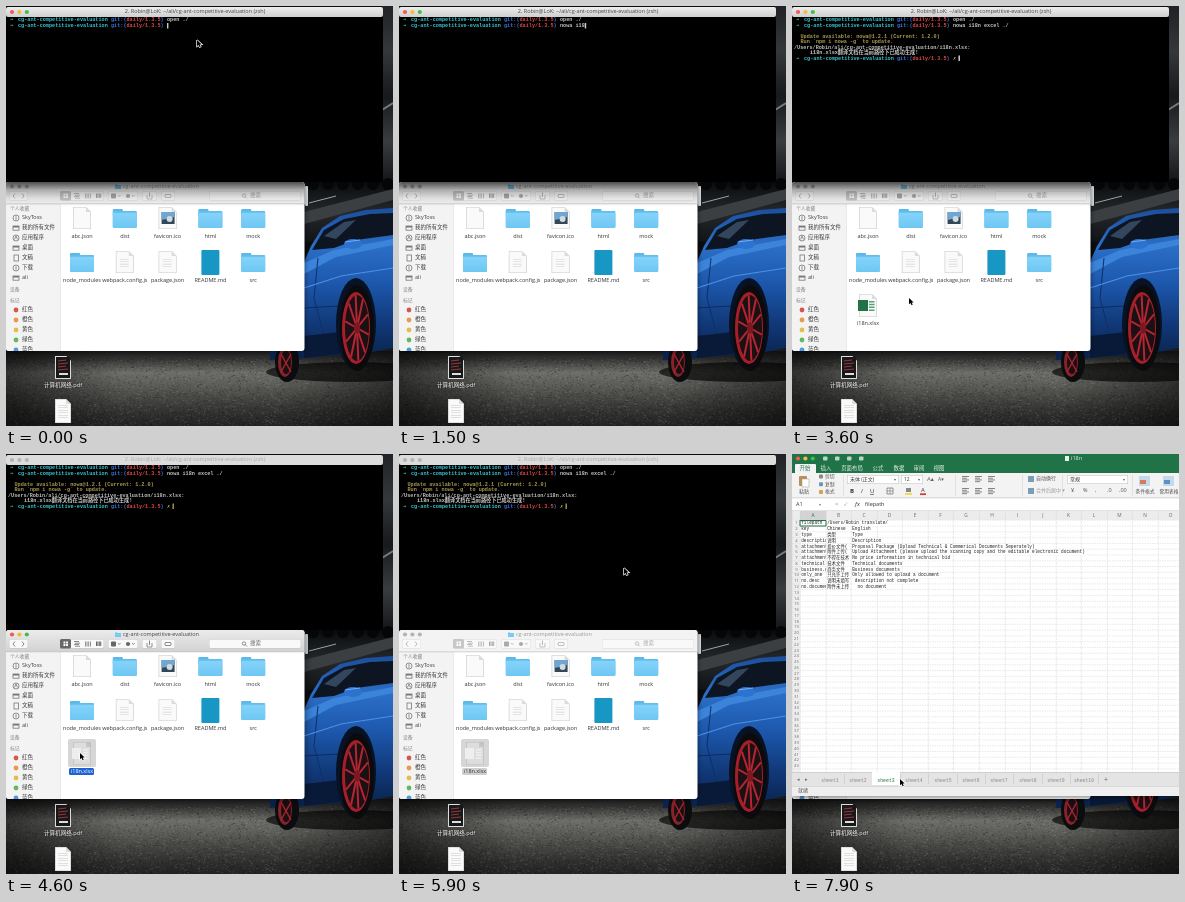
These frames come from a looping animation (387x420 px, 8 s). An HTML page with a canvas:

```html
<!DOCTYPE html>
<html lang="zh">
<head>
<meta charset="utf-8">
<style>
html, body { margin: 0; width: 100%; height: 100%; overflow: hidden; background: #000 }
canvas { display: block }
</style>
</head>
<body>
<canvas id="stage" width="387" height="420"></canvas>
<script>
const W = 387, H = 420, LOOP = 8000;
const SANS = '"Open Sans","Noto Sans CJK SC","Noto Sans CJK",sans-serif';
const MONO = '"Liberation Mono","DejaVu Sans Mono","Noto Sans CJK SC","Noto Sans CJK",monospace';
const screen = document.getElementById('stage').getContext('2d');
let g = screen;

function rect(x, y, w, h, c, r = 0) {
  g.fillStyle = c; g.beginPath(); g.roundRect(x, y, w, h, r); g.fill();
}
function oval(x, y, rx, ry, c) {
  g.fillStyle = c; g.beginPath(); g.ellipse(x, y, rx, ry, 0, 0, 7); g.fill();
}
function dot(x, y, r, c) { oval(x, y, r, r, c); }
function poly(c, ...p) {
  g.fillStyle = c; g.beginPath();
  for (let i = 0; i < p.length; i += 2) g.lineTo(p[i], p[i + 1]);
  g.fill();
}
function line(c, w, ...p) {
  g.strokeStyle = c; g.lineWidth = w; g.beginPath();
  for (let i = 0; i < p.length; i += 2) g.lineTo(p[i], p[i + 1]);
  g.stroke();
}
function text(s, x, y, size, c, align = 'left', font = SANS) {
  g.font = size + 'px ' + font; g.fillStyle = c; g.textAlign = align;
  g.textBaseline = 'middle'; g.fillText(s, x, y);
}
function fade(y0, y1, ...colors) {
  const f = g.createLinearGradient(0, y0, 0, y1);
  colors.forEach((c, i) => f.addColorStop(i / (colors.length - 1), c));
  return f;
}
// Piecewise linear value from [time, value] pairs
function along(keys, t) {
  let i = 1;
  while (i < keys.length - 1 && t > keys[i][0]) i++;
  const [a, b] = [keys[i - 1], keys[i]];
  const k = Math.min(1, Math.max(0, (t - a[0]) / (b[0] - a[0])));
  return a[1] + (b[1] - a[1]) * k;
}
function lights(y, on) {
  ['#f25b52', '#f3bb3a', '#42bd47'].forEach((c, i) => dot(6 + i * 7.4, y, 2.1, on ? c : '#b4b4b4'));
}

function page(x, y, w = 17, h = 22) {
  poly('#c9c9c9', x, y, x + w - 5, y, x + w, y + 5, x + w, y + h, x, y + h);
  poly('#fafafa', x + .6, y + .6, x + w - 5, y + .6, x + w - .6, y + 5, x + w - .6, y + h - .6, x + .6, y + h - .6);
  poly('#dcdcdc', x + w - 5, y, x + w, y + 5, x + w - 5, y + 5);
}
function folder(x, y, w = 24, h = 19) {
  rect(x, y, w * .42, h * .4, '#5bb9ea', 1);
  rect(x, y + h * .1, w, h * .88, '#62bdec', 1);
  rect(x, y + h * .2, w, h * .8, fade(y, y + h, '#8bd6fb', '#6dc7f3'), 1);
}

function wallpaper() {
  rect(0, 0, W, H, '#0b0c0e');
  rect(376, 0, 11, 180, fade(0, 180, '#202225', '#35383b', '#17191b', '#3a3d40', '#101113'));
  line('#777b7e', 2, 376, 104, 387, 97);
  rect(298, 176, 89, 60, fade(176, 236, '#0a0b0c', '#25282b', '#111315'));
  poly('#3b3f42', 298, 206, 387, 183, 387, 194, 298, 218);
  for (let i = 0; i < 6; i++) dot(307 + i * 15, 178, 6, '#050607');
  rect(299, 180, 3, 20, '#d9dfe2', 1);
  line('#9aa2a6', 1, 303, 197, 330, 190);

  rect(0, 335, W, 85, fade(340, 420, '#0e0f10', '#343433', '#6d6d69', '#5a5a57', '#444442', '#30302f', '#232323'));
  let seed = 7;
  const rnd = () => (seed = seed * 16807 % 2147483647) / 2147483647;
  for (let i = 0; i < 4200; i++) {
    const y = 352 + rnd() * 68;
    rect(rnd() * W, y, 1.3, .8, rnd() < .5 ? 'rgba(0,0,0,.28)' : 'rgba(190,190,180,.2)');
  }
  const side = g.createLinearGradient(0, 0, W, 0);
  side.addColorStop(0, 'rgba(0,0,0,.55)'); side.addColorStop(.3, 'rgba(0,0,0,0)');
  side.addColorStop(.7, 'rgba(0,0,0,0)'); side.addColorStop(1, 'rgba(0,0,0,.5)');
  rect(0, 345, W, 75, side);

  oval(345, 366, 85, 10, 'rgba(0,0,0,.65)');
  poly(fade(203, 350, '#1c4f9d', '#2b6fc8', '#1d58ad', '#123c7e', '#0a2450'),
    298, 256, 305, 240, 316, 222, 334, 210, 360, 204, 387, 202, 387, 342, 366, 346, 300, 352, 264, 354, 264, 338, 298, 330);
  poly('#0d1522', 306, 244, 318, 224, 338, 213, 364, 208, 387, 207, 387, 229, 350, 234, 328, 242);
  poly('#33465c', 318, 230, 338, 216, 350, 214, 330, 233);
  poly('#3c83da', 298, 257, 328, 244, 387, 233, 387, 239, 330, 251, 298, 268);
  oval(347, 238, 9, 5, '#2c72cf');
  line('#74aef0', 1, 339, 236, 354, 234);
  line('#0d3068', 1, 312, 252, 308, 292, 318, 330);
  line('#4b92e6', 1.2, 298, 282, 335, 270, 387, 262);
  line('#0c2c5f', 1, 298, 302, 332, 300);
  poly('#081a38', 298, 330, 334, 326, 334, 348, 298, 352);
  oval(350, 318, 20, 46, '#071225');
  oval(351, 322, 17, 43, '#0b0b0d');
  oval(350, 322, 14, 36, '#a51f2b');
  oval(351, 322, 12, 33, '#1b1013');
  for (let i = 0; i < 10; i++) {
    const a = i * Math.PI / 5 + .2;
    line('#b32632', 2, 351, 322, 351 + Math.cos(a) * 12, 322 + Math.sin(a) * 33);
  }
  oval(351, 322, 3, 6, '#7c1821');
  oval(281, 356, 12, 20, '#0b0c0e');
  oval(279, 356, 7, 15, '#87212a');
  oval(280, 356, 5, 12, '#1a0f12');
  line('#a3252f', 1.5, 275, 348, 285, 366);
  line('#a3252f', 1.5, 285, 348, 275, 366);

  page(49, 350, 16, 23);
  rect(50, 351, 14, 21, '#18181a');
  for (let i = 0; i < 4; i++) line('#a43b3f', .9, 52, 355 + i * 3, 60 + i % 2 * 2, 354 + i * 3);
  rect(53, 367, 9, 2, '#ddd');
  g.shadowColor = '#000'; g.shadowBlur = 2;
  text('计算机网络.pdf', 57, 380, 5.6, '#fff', 'center');
  g.shadowBlur = 0;
  page(49, 393, 16, 24);
  for (let i = 0; i < 6; i++) rect(52, 399 + i * 2.5, 10, .5, '#c5c5c5');
}

const CELL = 3.1;
function term(s, x, y, c, bold = true) {
  text(s, x, y, (bold ? 'bold ' : '') + 5.17, c, 'left', MONO);
}
function prompt(y, cmd, dirty) {
  term('➜', 4, y, '#35d0a0');
  term('cg-ant-competitive-evaluation', 12, y, '#37c6d2');
  term('git:(', 12 + 30 * CELL, y, '#3a72d8');
  term('daily/1.3.5', 12 + 35 * CELL, y, '#dc4a48');
  term(')', 12 + 46 * CELL, y, '#3a72d8');
  if (dirty) term('✗', 161, y, '#d6c35a');
  term(cmd, 161, y, '#c4c4c4');
}
function terminal(t) {
  const active = t < 4100;
  rect(0, 1, 377, 175, '#000', 2);
  rect(0, 1, 377, 10, active ? fade(1, 11, '#ededed', '#cfcfcf') : '#dcdcdc', 2);
  lights(6, active);
  text('2. Robin@LoK: ~/ali/cg-ant-competitive-evaluation (zsh)', 189, 6, 5.5, active ? '#444' : '#aaa', 'center');

  const typed = Math.floor(along([[200, 0], [800, 5], [1000, 5], [2200, 13], [2700, 18]], t));
  prompt(14, 'open ./');
  prompt(20, 'nowa i18n excel ./'.slice(0, typed));
  if (t < 2900) { rect(161 + typed * CELL, 17, 1.4, 5.5, '#ccc'); return; }
  if (t >= 3000) {
    term('Update available: nowa@1.2.1 (Current: 1.2.0)', 8.5, 30.5, '#a99a50');
    term('Run `npm i nowa -g` to update.', 8.5, 36, '#a99a50');
  }
  if (t < 3200) return;
  term('/Users/Robin/ali/cg-ant-competitive-evaluation/i18n.xlsx:', 2, 41.5, '#bdbdbd');
  term('i18n.xlsx翻译文档在当前路径下已成功生成!', 18, 47, '#c9c9c9');
  prompt(52.5, '', true);
  rect(166.5, 49.5, 1.4, 5.5, active ? '#ddd' : '#a99a50');
}

const PLACES = ['SkyToss', '我的所有文件', '应用程序', '桌面', '文稿', '下载', 'ali'];
const TAGS = [['红色', '#d95450'], ['橙色', '#e79a48'], ['黄色', '#dfc04c'], ['绿色', '#62b85c'], ['蓝色', '#4a9be0']];
const FILES = ['abc.json', 'dist', 'favicon.ico', 'html', 'mock', 'node_modules', 'webpack.config.js', 'package.json', 'README.md', 'src'];

function sideIcon(i, x, y) {
  const c = '#777';
  g.strokeStyle = c; g.lineWidth = .8;
  if (i == 0 || i == 2 || i == 5) {
    g.beginPath(); g.arc(x, y, 3, 0, 7); g.stroke();
    if (i == 2) line(c, .8, x - 1.5, y + 1.5, x, y - 2, x + 1.5, y + 1.5);
    else line(c, .8, x, y - 1.8, x, y + 1.8);
  } else if (i == 4) g.strokeRect(x - 2, y - 3, 4.5, 6);
  else g.strokeRect(x - 3, y - 2, 6, 4.2);
  if (i == 1 || i == 3 || i == 6) rect(x - 3, y - 2, 6, 1.4, c);
}
function fileIcon(name, x, y) {
  if (!name.includes('.')) return folder(x - 12, y + 2);
  if (name == 'README.md') return rect(x - 9, y - 1, 18, 25, '#1897c4', 1);
  page(x - 9, y, 18, 22);
  if (name == 'favicon.ico') {
    rect(x - 6, y + 5, 13, 12, '#33475b');
    poly('#6fa6d4', x - 6, y + 5, x + 7, y + 5, x + 7, y + 10, x - 6, y + 13);
    dot(x + 2, y + 12, 3, '#d4d9dc');
  } else if (name != 'abc.json') {
    for (let i = 0; i < 4; i++) rect(x - 5, y + 8 + i * 2.4, 9, .6, '#d2d2d2');
  }
}
function toolbar(active) {
  const ink = active ? '#666' : '#aaa';
  const box = (x, w) => { rect(x, 185, w, 9.5, active ? '#c4c4c4' : '#d9d9d9', 1.5); rect(x + .4, 185.4, w - .8, 8.7, '#f9f9f9', 1.3); };
  box(3, 19); box(54, 44); box(102, 30); box(136, 15); box(155, 14); box(203, 92);
  line(ink, .8, 9, 187.5, 7, 190, 9, 192.5);
  line(ink, .8, 16, 187.5, 18, 190, 16, 192.5);
  rect(54, 185, 11, 9.5, active ? '#686868' : '#c7c7c7', 1.5);
  for (let i = 0; i < 4; i++) {
    rect(57.5 + i % 2 * 2.6, 187.5 + (i >> 1) * 2.6, 1.9, 1.9, '#fff');
    rect(68 + i % 2, 187.3 + i * 1.5, 5, .6, ink);
    rect(79 + i * 1.7, 187.5, .7, 5, ink);
    rect(90 + i * 1.4, 187.5, 1, 4.5, ink);
  }
  rect(105, 187.5, 5, 5, ink, 1); line(ink, .7, 112, 189, 113.3, 190.5, 114.6, 189);
  dot(122, 190, 2.1, ink); line(ink, .7, 126, 189, 127.3, 190.5, 128.6, 189);
  line(ink, .8, 143.5, 191, 143.5, 186.5); line(ink, .7, 141, 189, 141, 193, 146, 193, 146, 189);
  rect(158.5, 188, 7, 4, ink, 2); rect(159.3, 188.8, 5.4, 2.4, '#f9f9f9', 1);
  g.strokeStyle = ink; g.lineWidth = .7; g.beginPath(); g.arc(238, 189.5, 1.7, 0, 7); g.stroke();
  line(ink, .7, 239.2, 190.7, 241, 192.5);
  text('搜索', 244, 190, 5.5, ink);
}
function finder(t) {
  const active = t >= 4100 && t < 5400, behind = t < 4100;
  g.shadowColor = 'rgba(0,0,0,.6)'; g.shadowBlur = active ? 10 : 5;
  rect(0, 176, 298.5, 169, '#fff', 3);
  g.shadowBlur = 0;
  g.save(); g.beginPath(); g.roundRect(0, 176, 298.5, 169, 3); g.clip();
  rect(0, 198, 54, 147, '#f3f3f3');
  rect(54, 198, .6, 147, '#dcdcdc');
  rect(0, 176, 299, 22, active ? fade(176, 198, '#ebebeb', '#d2d2d2') : '#f3f3f3');
  lights(180.5, active);
  folder(109, 178.5, 6, 4.5);
  text('cg-ant-competitive-evaluation', 117, 180.7, 5.5, active ? '#444' : '#999');
  toolbar(active);
  rect(0, 197.6, 299, .6, '#c3c3c3');

  text('个人收藏', 4, 203, 4.8, '#858585');
  PLACES.forEach((s, i) => {
    sideIcon(i, 10, 212 + i * 10);
    text(s, 16, 212 + i * 10, 5.5, '#3b3b3b');
  });
  text('设备', 4, 284, 4.8, '#858585');
  text('标记', 4, 295, 4.8, '#858585');
  TAGS.forEach(([s, c], i) => {
    dot(10, 304 + i * 10, 2.4, c);
    text(s, 16, 304 + i * 10, 5.5, '#3b3b3b');
  });
  FILES.forEach((s, i) => {
    const x = 76 + i % 5 * 42.8, y = 201 + (i > 4) * 44;
    fileIcon(s, x, y);
    text(s, x, y + 29.5, 5.5, '#333', 'center');
  });
  if (t >= 3300) sheetFile(t >= 4200, active);
  if (behind) rect(0, 176, 299, 25, fade(176, 201, 'rgba(0,0,0,.68)', 'rgba(0,0,0,.28)', 'rgba(0,0,0,.08)', 'rgba(0,0,0,0)'));
  g.restore();
}
function sheetFile(picked, active) {
  if (picked) {
    rect(62, 285, 28, 28, '#d6d6d6', 2);
    rect(63, 314, 25, 7, active ? '#1f62d4' : '#cfcfcf', 1.5);
  }
  page(67, 288, 18, 23);
  if (picked) {
    rect(67, 288, 18, 23, 'rgba(130,130,130,.25)');
    rect(66, 294, 9, 11, '#eee');
  } else rect(66, 294, 10, 11, '#217346');
  for (let i = 0; i < 4; i++) rect(77, 295 + i * 2.8, 5.5, 1.5, picked ? '#eee' : '#55a17a');
  text('i18n.xlsx', 76, 317.5, 5.5, picked && active ? '#fff' : '#333', 'center');
}

const COLS = [0, 8, 34, 59, 85, 110, 136, 161, 187, 213, 238, 264, 289, 315, 340, 366, 391];
const ROWS = `filepath|/Users/Robin translate/
key|Chinese|English
type|类型|Type
description|说明|Description
attachment.t|投价文件(|Proposal Package (Upload Technical & Commerical Documents Seperately)
attachment.u|附件上传(|Upload Attachment (please upload the scanning copy and the editable electronic document)
attachment.p|不得在技术|No price information in technical bid
technical.d|技术文件|Technical documents
business.do|商务文件|Business documents
only_one|只允许上传|Only allowed to upload a document
no.desc|说明未填写| description not complete
no.document|附件未上传|  no document`.split('\n').map(r => r.split('|'));
const TABX = [38, 66, 94, 122, 151, 179, 207, 236, 264, 292];

function ribbon() {
  const ink = '#555';
  rect(0, 0, W, 19, '#1f7346');
  lights(4.5, true);
  for (let i = 0; i < 4; i++) rect(31 + i * 12, 2.5, 4.5, 4, 'rgba(255,255,255,.7)', 1);
  rect(273, 2, 4, 5, '#e8f1ec'); text('i18n', 279, 4.5, 5.5, '#e8f1ec');
  rect(3, 10, 21, 10, '#f3f3f3', 1);
  ['开始', '插入', '页面布局', '公式', '数据', '审阅', '视图'].forEach((s, i) =>
    text(s, [13, 34, 60, 86, 107, 127, 147][i], 14.5, 5.4, i ? '#e4efe8' : '#1f7346', 'center'));
  rect(0, 19, W, 25, '#f3f3f3');
  rect(7, 22, 8, 10, '#b98f57', 1); rect(10, 25, 7, 8, '#fff'); line('#999', .5, 10, 25, 17, 25, 17, 33, 10, 33, 10, 25);
  text('粘贴', 12, 38, 5, ink, 'center');
  ['剪切', '复制', '格式'].forEach((s, i) => {
    rect(27, 20.5 + i * 7.7, 4, 4, ['#888', '#6c94b8', '#d5a250'][i], 1);
    text(s, 33, 22.7 + i * 7.7, 4.8, ink);
  });
  const field = (x, w, s) => {
    rect(x, 21, w, 9, '#bbb'); rect(x + .5, 21.5, w - 1, 8, '#fff');
    text(s, x + 3, 25.5, 5, '#333'); text('▾', x + w - 5, 25.5, 4, ink);
  };
  field(55, 52, '宋体 (正文)'); field(109, 22, '12'); field(275, 61, '常规');
  text('A▴', 135, 25.5, 6, ink); text('A▾', 146, 25.5, 5, ink);
  text('B', 58, 37, 'bold 6', '#333'); text('I', 69, 37, 'italic 6', '#333'); text('U', 78, 37, 6, '#333');
  rect(78, 40.2, 4, .6, '#333');
  line(ink, .6, 95, 34, 101, 34, 101, 40, 95, 40, 95, 34); line(ink, .5, 98, 34, 98, 40); line(ink, .5, 95, 37, 101, 37);
  rect(114, 34, 5, 4, '#888'); rect(113, 39, 7, 1.8, '#f0d83e');
  text('A', 129, 36, 6, '#333'); rect(128, 39.3, 6, 1.8, '#d33d33');
  for (let b = 0; b < 6; b++) for (let i = 0; i < 4; i++)
    rect(170 + b % 3 * 13, 22 + (b > 2) * 12 + i * 1.8, i % 2 ? 5 : 7, .7, ink);
  rect(236, 22, 6, 6, '#7d9db5'); text('自动换行', 244, 25, 5, ink);
  rect(236, 34, 6, 6, '#7d9db5'); text('合并后居中 ▾', 244, 37, 5, '#999');
  ['¥', '%', ',', '.0', '.00'].forEach((s, i) => text(s, 279 + i * 12, 37, 5.5, ink));
  for (let i = 0; i < 2; i++) {
    rect(347 + i * 24, 22, 11, 10, '#c5d9e8'); rect(348 + i * 24, 26, 6, 4, i ? '#5b91c5' : '#d57a5a');
    text(i ? '套用表格' : '条件格式', 353 + i * 24, 37.5, 4.8, ink, 'center');
  }
  [51, 163, 230, 270, 340].forEach(x => rect(x, 21, .5, 21, '#d0d0d0'));
}
function spreadsheet(t) {
  g.shadowColor = 'rgba(0,0,0,.7)'; g.shadowBlur = 8;
  rect(0, 0, W, 342, '#fff');
  g.shadowBlur = 0;
  ribbon();
  rect(0, 44, W, 13, '#fff'); rect(0, 43.6, W, .6, '#c8c8c8'); rect(0, 56.5, W, .6, '#c8c8c8');
  text('A1', 4, 50.5, 5.5, '#333'); text('▾', 27, 50.5, 4, '#777');
  text('×', 43, 50.5, 6, '#999'); text('✓', 52, 50.5, 5, '#999');
  text('fx', 63, 50.5, 'italic 6', '#333'); text('filepath', 73, 50.5, 5.5, '#333');

  rect(0, 57, W, 9, '#ececec'); rect(0, 66, 8, 252, '#efefef');
  rect(8, 57, 26, 9, '#d3d3d3');
  const pitch = 5.78;
  g.setLineDash([1.5, 1]);
  for (let i = 0; i < 44; i++) line('#dadada', .6, 0, 66.3 + i * pitch, W, 66.3 + i * pitch);
  COLS.forEach(x => line('#d0d0d0', .6, x + .3, 57, x + .3, 318));
  g.setLineDash([]);
  for (let i = 0; i < 15; i++) text(String.fromCharCode(65 + i), (COLS[i + 1] + COLS[i + 2]) / 2, 61.8, 4.8, i ? '#666' : '#1f7346', 'center');
  for (let i = 0; i < 43; i++) text(i + 1, 4.5, 69.3 + i * pitch, 4.2, '#666', 'center');
  ROWS.forEach((row, r) => row.forEach((s, c) => {
    const y = 69.3 + r * pitch, last = c == row.length - 1;
    g.save(); g.beginPath();
    g.rect(COLS[c + 1], y - 3, last ? 400 : COLS[c + 2] - COLS[c + 1], 6); g.clip();
    if (last) rect(COLS[c + 1] + 1, y - 2.3, s.length * 2.65, 4.8, '#fff');
    text(s, COLS[c + 1] + 1.2, y, 4.42, '#222', 'left', MONO);
    g.restore();
  }));
  line('#1f7346', 1, 8, 66.5, 34, 66.5, 34, 72, 8, 72, 8, 66);

  rect(0, 318, W, 14, '#e4e4e4'); rect(0, 318, W, .6, '#bbb');
  text('◂', 5, 326, 5, '#666'); text('▸', 13, 326, 5, '#666');
  const current = t < 7400 ? 0 : t < 7800 ? 1 : 2;
  TABX.forEach((x, i) => {
    if (i == current) rect(x - 14, 318, 28, 13, '#fff');
    rect(x + 14, 320, .5, 10, '#c0c0c0');
    text('sheet' + (i + 1), x, 326.5, 4.8, i == current ? '#1f7346' : '#888', 'center', MONO);
  });
  text('+', 314, 326, 7, '#666', 'center');
  rect(0, 332, W, 10, '#efefef'); rect(0, 332, W, .6, '#c4c4c4');
  text('就绪', 6, 337, 5, '#555');
}

const MOUSE_X = [[2900, 192], [3300, 150], [3600, 118], [4100, 75], [5300, 75], [5900, 226], [6400, 226], [7000, 40], [7300, 66], [7500, 68], [7800, 98], [7900, 109]];
const MOUSE_Y = [[2900, 37], [3300, 190], [3600, 295], [4100, 302], [5300, 302], [5900, 117], [6400, 150], [7000, 328], [7900, 328]];
function mouse(t) {
  if (t >= 300 && t < 2900) return;
  const x = along(MOUSE_X, t) - 1, y = along(MOUSE_Y, t) - 3;
  const arrow = [0, 0, 0, 6.2, 1.5, 4.9, 2.6, 7.2, 3.7, 6.7, 2.7, 4.5, 4.7, 4.4, 0, 0].map((v, i) => v + (i % 2 ? y : x));
  line('#fff', 1.4, ...arrow);
  poly('#000', ...arrow);
}

const backdrop = document.createElement('canvas');
backdrop.width = W; backdrop.height = H;
g = backdrop.getContext('2d');
wallpaper();
g = screen;

function draw(now) {
  const t = Math.floor(now % LOOP / 100) * 100;
  g.drawImage(backdrop, 0, 0);
  if (t < 4100) { finder(t); terminal(t); }
  else { terminal(t); finder(t); }
  if (t >= 6500) spreadsheet(t);
  mouse(t);
}
const start = performance.now();
function tick() {
  draw(performance.now() - start);
  requestAnimationFrame(tick);
}
tick();
</script>
</body>
</html>
```
